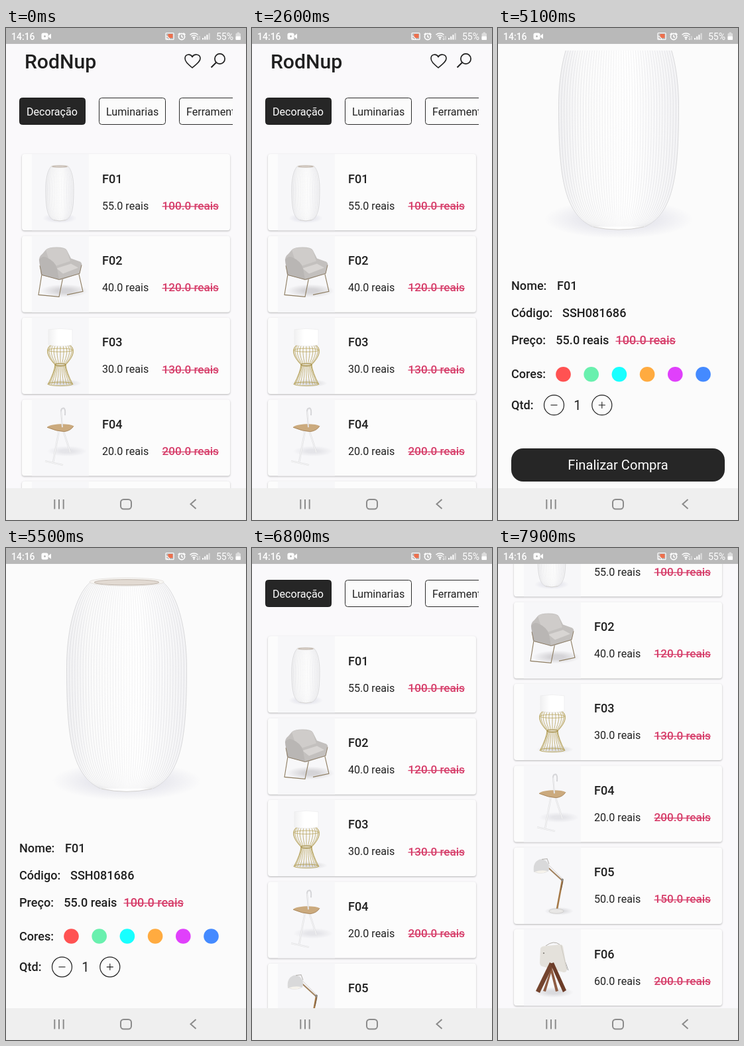
Recreate the animation shown at these times as an HTML page with a canvas. Size 362 px wide and 742 px high, loop 8000 ms.

```html
<!DOCTYPE html>
<html lang="pt">
<head>
<meta charset="utf-8">
<title>Loja de móveis</title>
<style>
html, body { margin: 0; width: 100%; height: 100%; overflow: hidden; background: #faf9fb; }
canvas { display: block; width: 362px; height: 742px; }
</style>
</head>
<body>
<canvas id="stage"></canvas>
<script>
const W = 362, H = 742, LOOP = 8000, STEP = 100;
const INK = '#202020', PINK = '#d63c69';
const dpr = window.devicePixelRatio || 1;
const stage = document.getElementById('stage');
const layer = document.createElement('canvas');
for (const c of [stage, layer]) { c.width = W * dpr; c.height = H * dpr; }
const main = stage.getContext('2d'), sheet = layer.getContext('2d');
let g = main;

const PRICES = [[55, 100], [40, 120], [30, 130], [20, 200], [50, 150], [60, 200]];
const CHIPS = [['Decoração', 20, 100], ['Luminarias', 140, 101], ['Ferramentas', 261, 113],
  ['Sala de Estar', 394, 116], ['Quarto', 530, 76]];
const COLORS = ['#ff5252', '#69f0ae', '#18ffff', '#ffab40', '#e040fb', '#448aff'];
const CARD_TOP = 190, CARD_H = 115.3, PITCH = 123.4;
const CHIP_MAX = 188, DETAIL_MAX = 160.5, LIST_MAX = 232;

// ---- motion ----
const clamp = p => Math.max(0, Math.min(1, p));
const part = (t, a, b) => clamp((t - a) / (b - a));
const easeOut = p => 1 - (1 - p) ** 2;
const smooth = p => p * p * (3 - 2 * p);
const fling = p => 1 - (1 - p ** 1.225) ** 4;

function bezier(x1, y1, x2, y2, x) {
  const at = (a, b, s) => 3 * (1 - s) ** 2 * s * a + 3 * (1 - s) * s * s * b + s ** 3;
  let lo = 0, hi = 1;
  for (let i = 0; i < 24; i++) {
    const mid = (lo + hi) / 2;
    if (at(x1, x2, mid) < x) lo = mid; else hi = mid;
  }
  return at(y1, y2, lo);
}

const chipScroll = t => CHIP_MAX * (smooth(part(t, 1000, 1500)) - smooth(part(t, 2000, 2600)));
const detailScroll = t => DETAIL_MAX * (easeOut(part(t, 4500, 4800)) - smooth(part(t, 5200, 5900)));
const listScroll = t => Math.round(LIST_MAX * fling(part(t, 6700, 7600)));
function pageProgress(t) {
  if (t < 3700 || t >= 6600) return 0;
  if (t < 3800) return 0.915;
  return t < 6300 ? 1 : clamp(0.7 - (t - 6300) / 300);
}

// ---- drawing helpers ----
function text(s, x, y, size, weight = 400, color = INK, align = 'left') {
  g.font = `${weight} ${size}px Roboto, sans-serif`;
  g.fillStyle = color;
  g.textAlign = align;
  g.fillText(s, x, y);
}
function struck(s, x, y, size) {
  text(s, x, y, size, 500, PINK);
  g.fillRect(x, y - size * 0.31, g.measureText(s).width, 1.3);
}
function finish(fill, stroke, lw, shape) {
  if (fill) { g.fillStyle = fill; shape ? g.fill(shape) : g.fill(); }
  if (stroke) { g.strokeStyle = stroke; g.lineWidth = lw; shape ? g.stroke(shape) : g.stroke(); }
}
function box(x, y, w, h, r, fill, stroke, lw = 1) {
  g.beginPath();
  g.roundRect(x, y, w, h, r);
  finish(fill, stroke, lw);
}
function disc(x, y, rx, ry, fill, stroke, lw = 1) {
  g.beginPath();
  g.ellipse(x, y, rx, ry, 0, 0, 7);
  finish(fill, stroke, lw);
}
function path(d, fill, stroke, lw = 1) {
  finish(fill, stroke, lw, new Path2D(d));
}
function clipped(x, y, w, h, draw) {
  g.save();
  g.beginPath();
  g.rect(x, y, w, h);
  g.clip();
  draw();
  g.restore();
}
function moved(x, y, draw) {
  g.save();
  g.translate(x, y);
  draw();
  g.restore();
}
function glow(x, y, rx, ry, rgb, a) {
  moved(x, y, () => {
    g.scale(1, ry / rx);
    const grad = g.createRadialGradient(0, 0, rx * 0.3, 0, 0, rx);
    grad.addColorStop(0, `rgba(${rgb},${a})`);
    grad.addColorStop(1, `rgba(${rgb},0)`);
    disc(0, 0, rx, rx, grad);
  });
}

// ---- products, in card coordinates ----
function vase(cx, top, w, h, ribs) {
  const side = f => `M${-0.3 * f * w} ${0.02 * h}
    C${-0.43 * f * w} ${0.08 * h} ${-0.5 * f * w} ${0.25 * h} ${-0.5 * f * w} ${0.42 * h}
    C${-0.5 * f * w} ${0.74 * h} ${-0.46 * f * w} ${0.92 * h} ${-0.22 * f * w} ${0.985 * h}`;
  glow(cx, top + h * 0.95, w * 0.62, h * 0.09, '205,205,220', 0.55);
  moved(cx, top, () => {
    const grad = g.createLinearGradient(-w / 2, 0, w / 2, 0);
    grad.addColorStop(0, '#f1f1f3');
    grad.addColorStop(0.2, '#fbfbfb');
    grad.addColorStop(0.6, '#ffffff');
    grad.addColorStop(1, '#f3f3f5');
    const body = `${side(1)} Q0 ${1.015 * h} ${0.22 * w} ${0.985 * h}
      C${0.46 * w} ${0.92 * h} ${0.5 * w} ${0.74 * h} ${0.5 * w} ${0.42 * h}
      C${0.5 * w} ${0.25 * h} ${0.43 * w} ${0.08 * h} ${0.3 * w} ${0.02 * h}Z`;
    path(body, grad, '#e6e6e8', 0.8);
    for (let k = -ribs; k <= ribs; k++)
      path(side(k / ribs), null, `rgba(130,130,140,${0.1 + 0.08 * Math.abs(k / ribs)})`, 0.9);
    path(`M${-0.21 * w} ${0.986 * h}Q0 ${1.012 * h} ${0.21 * w} ${0.986 * h}`, null, '#d2d0ce', 0.9);
    disc(0, 0.02 * h, 0.31 * w, 0.019 * h, '#f7f5f2', '#dedad6', 0.7);
    disc(0, 0.022 * h, 0.27 * w, 0.013 * h, '#e2dad2', '#b5aaa0', 0.8);
  });
}
function chair() {
  glow(88, 83, 36, 10, '190,188,192', 0.6);
  path('M54 58L49 89L80 92L86 62M110 58L116 84L92 89', null, '#8d7c60', 1.1);
  path('M50 36Q50 31 55 27L60 21Q64 17 76 17Q90 17 92 22L98 34L112 39Q115 41 114 45L111 57L84 66Q78 67 74 64L53 59Z', '#c3c0be');
  path('M60 21Q66 17 78 18Q90 18 92 23L97 38L76 45L64 34Z', '#cfccca');
  path('M76 49L98 42L109 48L86 57Z', '#d8d5d3');
  path('M50 36Q54 30 60 32Q74 38 77 49L80 66L53 59Z', '#b9b6b4');
  path('M51 45L54 59L80 66L111 57L114 44', null, '#8d7d66', 1);
}
function goldLamp() {
  glow(86, 99, 28, 6, '190,190,195', 0.5);
  for (let k = -6; k <= 6; k++) {
    const f = Math.sin(k / 6 * Math.PI / 2);
    path(`M${82 + 14 * f} 41C${82 + 23 * f} 47 ${82 + 21 * f} 58 ${82 + 8 * f} 71
      Q${82 + 9 * f} 82 ${82 + 19 * f} 101`, null, '#b7a25c', 0.8);
  }
  disc(82, 49, 19, 2.6, null, '#b5a052', 0.7);
  disc(82, 71, 8, 1.8, null, '#9d853a', 1.1);
  disc(82, 100, 19, 2.8, null, '#b5a052', 0.9);
  const grad = g.createLinearGradient(64, 0, 100, 0);
  grad.addColorStop(0, '#f0f0f1');
  grad.addColorStop(0.4, '#ffffff');
  path('M64 18L64 41Q82 45 100 41L100 18Q82 15 64 18Z', grad, '#ebebed', 0.7);
}
function sideTable() {
  glow(92, 78, 30, 8, '200,200,208', 0.4);
  const frame = 'M80 46L71 95M86 46L97 80M59 93L86 99';
  path(frame, null, '#dedee1', 2.4);
  path(frame, null, '#fafafa', 1);
  path('M62 42Q64 38 82 37Q98 37 102 40Q98 47 88 48.500Q76 48 62 42Z', '#cbaa7e');
  path('M62 42Q76 48 88 48.500Q98 47 102 40', null, '#a58358', 0.9);
  path('M85 42L83 18Q83 13 87 13Q90 14 89 24', null, '#d5d5d8', 2);
  path('M85 42L83 18', null, '#f3f3f4', 0.9);
}
function deskLamp() {
  glow(92, 96, 22, 6, '190,190,195', 0.5);
  path('M75 30L97 50', null, '#a1825f', 2);
  path('M76 26L98 48', null, '#c9c5c0', 0.8);
  path('M97 50L89 93', null, '#a67a48', 2.6);
  path('M98 51L95 64', null, '#6a5440', 0.9);
  disc(97, 49, 2, 2, '#8c8780');
  disc(88, 96, 11, 3.6, '#e8e7e6', '#c6c4c2', 0.7);
  path('M54 37Q52 22 63 18Q72 17 76 25Q78 31 76 36Q66 42 54 37Z', '#d9d9da');
  path('M55 37Q66 41 75 36Q66 33 55 37Z', '#f6f3ec');
  path('M66 18L74 17L77 25', null, '#bbb8b6', 1.2);
}
function spotlight() {
  glow(84, 95, 30, 8, '190,190,195', 0.5);
  path('M72 25Q84 16 93 23L98 34', null, '#b2aea8', 1);
  path('M102 50L106 62', null, '#888', 0.7);
  path('M64 29Q65 26 69 25.500L94 23Q97 23 98 26L104 60Q104 65 99 65L67 56Q63 55 63 50Z', '#e4e1db');
  path('M95 24L104 61', null, '#cdc9c2', 1);
  disc(69, 36, 1.1, 1.1, '#7c7872');
  path('M81 56L91 93L87 94L80 66L72 94L68 93Z', '#8f5c42');
  path('M78 50L84 53L63 96L57 93Z', '#74442e');
  path('M79 52L84 50L103 92L98 95Z', '#6c3c28');
}
const PRODUCTS = [() => vase(81, 17, 42, 84, 8), chair, goldLamp, sideTable, deskLamp, spotlight];

// ---- pages ----
function header() {
  text('RodNup', 28, 60.5, 30.2, 500);
  path('M281 60C274 54 270 50.500 270 46C270 39.500 278 38.200 281 43.500C284 38.200 293 39.500 293 46C293 50.500 288 54 281 60Z', null, INK, 1.6);
  disc(322.5, 46.5, 7.6, 7.6, null, INK, 1.7);
  path('M317 52L309.500 59.500', null, INK, 1.9);
}
function chips(scroll) {
  clipped(20, 100, 322, 52, () => CHIPS.forEach(([name, x, w], i) => {
    const on = i === 0;
    box(x - scroll + 0.5, 105.5, w - 1, 40, 4, on ? '#262626' : '#fbfbfb', on ? '#1c1c1c' : '#2b2b2b');
    text(name, x - scroll + 11, 131.5, 16.1, 400, on ? '#fff' : INK);
  }));
}
function card([now, old], i) {
  moved(0, CARD_TOP + PITCH * i, () => {
    g.save();
    g.shadowColor = 'rgba(0,0,0,.28)';
    g.shadowBlur = 2.5 * dpr;
    g.shadowOffsetY = dpr;
    box(24, 0, 314, CARD_H, 4, '#fcfcfc');
    g.restore();
    box(39, 0, 86, CARD_H, 0, '#f7f7f9');
    PRODUCTS[i]();
    text('F0' + (i + 1), 145, 43.6, 18.1, 500);
    text(now.toFixed(1) + ' reais', 145, 83.6, 16.1);
    struck(old.toFixed(1) + ' reais', 235.5, 83.8, 17.1);
  });
}
function listPage(t) {
  box(0, 0, W, H, 0, '#faf9fb');
  moved(0, -listScroll(t), () => {
    header();
    chips(chipScroll(t));
    PRICES.forEach(card);
  });
}
function label(name, value, x, y) {
  text(name, 20, y, 18.1, 500);
  if (value) text(value, x, y, 18.1, 500);
}
function roundButton(x, y, plus) {
  disc(x, y, 15, 15, null, INK, 1.2);
  path(`M${x - 5} ${y}h10` + (plus ? `M${x} ${y - 5}v10` : ''), null, INK, 1.1);
}
function detailBody() {
  vase(182, 142, 181, 323, 22);
  path('M31.500 57.500L22 66.500L31.500 75.500', null, INK, 2.2);
  moved(0, DETAIL_MAX, () => {
    label('Nome:', 'F01', 89, 395.4);
    label('Código:', 'SSH081686', 97, 436.4);
    label('Preço:', '55.0 reais', 87.3, 477.4);
    struck('100.0 reais', 177.5, 477.4, 18.1);
    label('Cores:', '', 0, 528.4);
    COLORS.forEach((c, i) => disc(98.5 + 42.2 * i, 522.3, 11.3, 11.3, c));
    label('Qtd:', '', 0, 575.2);
    roundButton(84.5, 568.7, false);
    text('1', 120, 576, 20.1, 400, INK, 'center');
    roundButton(156.8, 568.7, true);
    box(20, 634, 322, 50, 18, '#262626');
    text('Finalizar Compra', 181, 666.3, 20.1, 400, '#fff', 'center');
  });
}
function detailPage(t) {
  const p = pageProgress(t);
  if (!p) return;
  const rise = Math.round(0.25 * 670 * (1 - bezier(0.4, 0, 0.2, 1, p)));
  g = sheet;
  g.setTransform(dpr, 0, 0, dpr, 0, 0);
  g.clearRect(0, 0, W, H);
  moved(0, rise, () => {
    box(0, 0, W, H, 0, '#fbfbfb');
    clipped(20, 34, 322, 650, () => moved(0, -detailScroll(t), detailBody));
  });
  g = main;
  g.globalAlpha = bezier(0.42, 0, 1, 1, p);
  g.drawImage(layer, 0, 0, W, H);
  g.globalAlpha = 1;
}

// ---- system bars ----
function statusBar() {
  box(0, 0, W, 24, 0, '#b9b9b9');
  text('14:16', 8, 17.5, 14, 500, '#fff');
  box(53.5, 7.5, 10, 10, 2.5, '#fff');
  path('M64 11.500L68 8.500V16.500L64 13.500Z', '#fff');
  disc(58.5, 12.5, 1.5, 1.5, '#b9b9b9');
  box(241, 7.5, 12, 10, 1, null, '#fff', 1.2);
  box(244.5, 9, 7, 6, 0, '#ee6f4c');
  path('M241 12Q246 13 247 18M241 15Q244 15.500 244 18', null, '#fff', 1.2);
  disc(265, 13, 4.6, 4.6, null, '#fff', 1.7);
  path('M265 10.500V13.200L267 14.200M259.500 10L262.500 7.500M267.500 7.500L270.500 10', null, '#fff', 1.6);
  for (let i = 0; i < 3; i++) {
    g.beginPath();
    g.arc(283.5, 17, 3 + 3 * i, -2.3, -0.84);
    finish(null, '#fff', 1.5);
  }
  disc(283.5, 16.5, 1.3, 1.3, '#fff');
  path('M289 12V18M287.500 16L289 18L290.500 16M292 18V12', null, '#f4f4f4', 0.8);
  for (let i = 0; i < 4; i++) box(296 + 3.2 * i, 15 - 2.4 * i, 2, 2.6 + 2.4 * i, 0, i < 3 ? '#fff' : '#dedede');
  text('55%', 317, 17.5, 14, 400, '#fff');
  box(346.5, 8, 7.5, 10, 1, '#dcdcdc');
  box(348.5, 6.5, 3.5, 2, 0, '#dcdcdc');
  box(346.5, 12.5, 7.5, 5.5, 1, '#fff');
}
function navBar() {
  const gray = '#8b8b8b';
  box(0, 694, W, 48, 0, '#efefef');
  for (let i = 0; i < 3; i++) box(72.3 + 6.7 * i, 711, 2, 14.5, 0, gray);
  box(173, 711, 16, 14.5, 4.5, null, gray, 2);
  path('M286.500 711L278.500 718L286.500 725', null, gray, 2);
}

function frame(now) {
  const t = Math.floor((now % LOOP) / STEP) * STEP;
  g = main;
  g.setTransform(dpr, 0, 0, dpr, 0, 0);
  listPage(t);
  detailPage(t);
  statusBar();
  navBar();
}

const start = performance.now();
function tick() {
  frame(performance.now() - start);
  requestAnimationFrame(tick);
}
tick();
</script>
</body>
</html>
```
